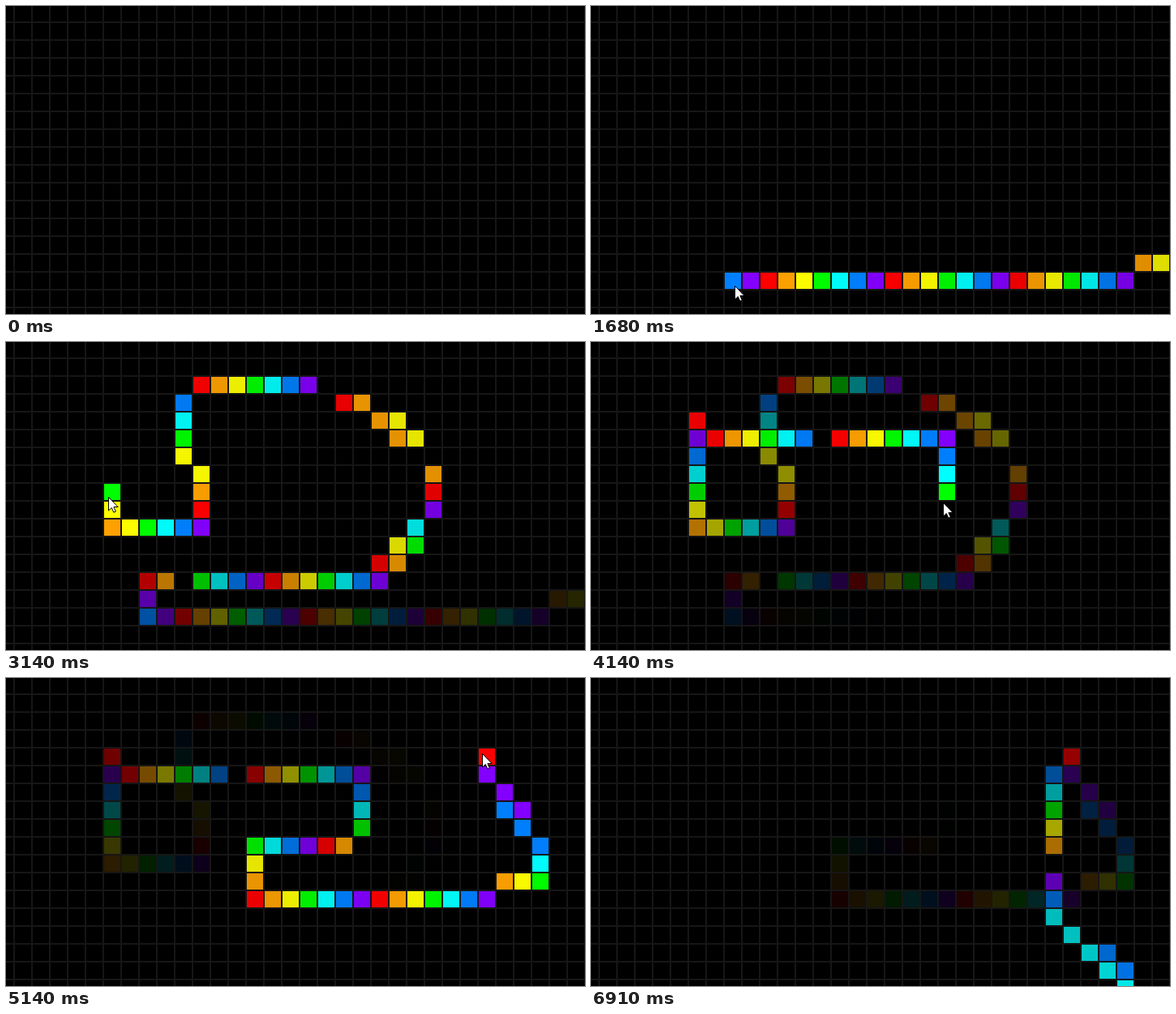
Animation of 714 by 380 pixels, one loop 7.06 s. Source, as an HTML page with a canvas:

```html
<!DOCTYPE html>
<html lang="en">
<head>
<meta charset="utf-8">
<title>Rainbow trail</title>
<style>
  html, body { margin: 0; height: 100%; overflow: hidden; background: #000; }
  canvas { display: block; }
</style>
</head>
<body>
<canvas id="stage" width="714" height="380"></canvas>
<script>
const ctx = document.getElementById('stage').getContext('2d');
const LOOP = 7060, START = 910, FRAME = 1000 / 13, FADE = 3000;
const CELL = 22, LEFT = 10, TOP = 20;
const rainbow = [[255, 0, 0], [255, 162, 0], [255, 255, 0], [0, 255, 0],
                 [0, 255, 255], [0, 128, 255], [132, 0, 255]];

// Compass moves from cell to cell; lower case passes over a cell without lighting it
const route = `W SW W22 N2 E e E11 N E N E N NE N2 n NW W N W NW W nw W7 SW S3 SE S3
  W5 N6 SE E5 e E7 S3 s W6 S3 E13 NE E2 N2 NW N W N NW N
  SW S4 s S3 SE2 E S E S SE`;

// Pace of the hand: [time in ms, moves made]
const pace = [
  [910, 0], [1160, 12], [1460, 22], [1640, 24], [1880, 25], [2060, 28], [2250, 39],
  [2445, 48], [2600, 62], [2900, 75], [3220, 78], [3290, 81], [3530, 82], [3820, 95],
  [4110, 99], [4290, 100], [4350, 105], [4530, 108], [4730, 121], [4970, 130],
  [5110, 132.5], [5555, 133], [5880, 143], [6050, 146], [6200, 147], [6270, 148]
];

const lerp = (a, b, u) => a + (b - a) * u;

// Reads the pace in either direction: time to moves, or moves to time
function readPace(value, from, to) {
  const i = Math.max(1, pace.findIndex(key => key[from] >= value));
  const [a, b] = [pace[i - 1], pace[i]];
  return lerp(a[to], b[to], (value - a[from]) / (b[from] - a[from]));
}
const movesAt = time => readPace(time, 0, 1);
const timeOf = moves => readPace(moves, 1, 0);

function walk(col, row) {
  const cells = [{ col, row, lit: true }];
  for (const [, way, count] of route.matchAll(/([A-Za-z]+)(\d*)/g)) {
    const dir = way.toUpperCase();
    for (let i = 0; i < (count || 1); i++) {
      col += dir.includes('E') - dir.includes('W');
      row += dir.includes('S') - dir.includes('N');
      cells.push({ col, row, lit: way === dir });
    }
  }
  return cells;
}
const cells = walk(31, 13);
const last = cells.length - 1;
cells.forEach((cell, i) => {
  cell.enter = timeOf(i);
  cell.leave = timeOf(Math.min(i + 1, last));
});

// cubic-bezier(.42, 0, .58, 1)
function easeInOut(x) {
  if (x <= 0) return 0;
  if (x >= 1) return 1;
  let lo = 0, hi = 1, s;
  for (let i = 0; i < 16; i++) {
    s = (lo + hi) / 2;
    const bx = 1.26 * s * (1 - s) ** 2 + 1.74 * s * s * (1 - s) + s ** 3;
    if (bx < x) lo = s; else hi = s;
  }
  return s * s * (3 - 2 * s);
}

function drawGrid() {
  ctx.fillStyle = '#000';
  ctx.fillRect(0, 0, 714, 380);
  ctx.fillStyle = '#161616';
  for (let x = LEFT - 1; x < 714; x += CELL) ctx.fillRect(x, 0, 2, 380);
  for (let y = TOP - 1; y < 380; y += CELL) ctx.fillRect(0, y, 714, 2);
}

function drawCell({ col, row, lit, enter, leave }, t) {
  if (!lit || t < enter) return;
  const level = 1 - easeInOut((t - leave) / FADE);
  const color = rainbow[(col - row + 12) % 7].map(c => Math.round(c * level));
  ctx.fillStyle = `rgb(${color})`;
  ctx.fillRect(LEFT + 1 + col * CELL, TOP + 1 + row * CELL, CELL - 2, CELL - 2);
}

const arrow = new Path2D('M0 0V16.5L3.8 13L6.3 18.7L8.8 17.6L6.4 12H11.6Z');

function drawPointer(t) {
  if (t < START || t >= timeOf(last)) return;
  const moves = movesAt(t);
  const s = Math.max(0, moves - 0.5); // mid-cell is half a move after entering
  const i = Math.floor(s);
  const [a, b] = [cells[i], cells[i + 1]];
  const x = LEFT + (lerp(a.col, b.col, s - i) + 0.5) * CELL - 4;
  const y = TOP + (lerp(a.row, b.row, s - i) + 0.5) * CELL + 9 - moves / 10; // slow upward drift
  ctx.save();
  ctx.translate(Math.round(x - 1) + 0.5, Math.round(y - 1) + 0.5);
  ctx.fillStyle = '#fff';
  ctx.strokeStyle = '#000';
  ctx.fill(arrow);
  ctx.stroke(arrow);
  ctx.restore();
}

function draw(now) {
  const k = Math.floor((now % LOOP - START + 5) / FRAME);
  const t = START + k * FRAME;
  drawGrid();
  cells.forEach(cell => drawCell(cell, t));
  drawPointer(t);
}

const begin = performance.now();
function tick() {
  draw(performance.now() - begin);
  requestAnimationFrame(tick);
}
tick();
</script>
</body>
</html>
```
